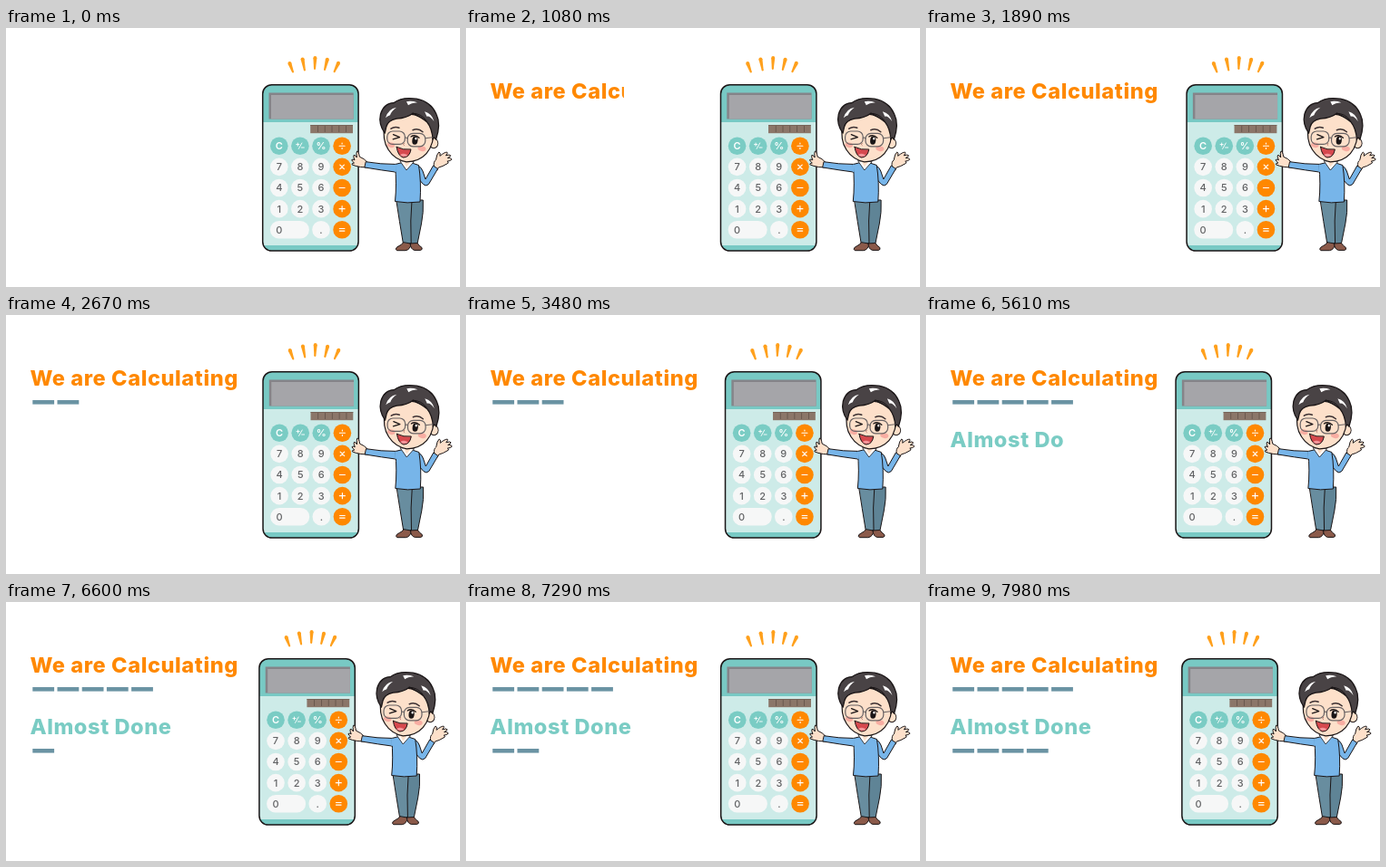
An HTML page with a canvas for the animation above (8 s loop, 500 by 286 pixels).

```html
<!DOCTYPE html>
<html lang="en">
<head>
<meta charset="utf-8">
<title>We are Calculating</title>
<style>
html, body { margin: 0; width: 100%; height: 100%; overflow: hidden; background: #fff; }
canvas { display: block; width: 500px; height: 286px; }
</style>
</head>
<body>
<canvas id="stage"></canvas>
<script>
const W = 500, H = 286, LOOP = 8000;
const ORANGE = '#ff8800', TEAL = '#7accc4', SLATE = '#6a93a3';
const SKIN = '#fde0ca', BLUE = '#77b5e9', INK = '#1a1516';
const canvas = document.getElementById('stage');
const ctx = canvas.getContext('2d');
const dpr = window.devicePixelRatio || 1;
canvas.width = W * dpr;
canvas.height = H * dpr;

// Sideways sway: [time, offset], eased between turning points
const SWAY = [[0, 0], [400, 5], [1200, -2.6], [2050, 5], [2950, -1], [3850, 5],
  [5480, -8.2], [6250, 0], [6850, -6], [7290, -2], [7640, -5], [8000, -0.8]];

function swayAt(t) {
  const i = SWAY.findIndex(k => k[0] > t);
  const [t0, a] = SWAY[i - 1], [t1, b] = SWAY[i];
  return a + (b - a) * (1 - Math.cos(Math.PI * (t - t0) / (t1 - t0))) / 2;
}

function path(d, fill, stroke, width = 1) {
  const p = new Path2D(d);
  if (fill) { ctx.fillStyle = fill; ctx.fill(p); }
  if (stroke) { ctx.strokeStyle = stroke; ctx.lineWidth = width; ctx.stroke(p); }
}

function rect(x, y, w, h, fill) {
  ctx.fillStyle = fill;
  ctx.fillRect(x, y, w, h);
}

function round(x, y, w, h, r, fill, stroke, width = 1) {
  ctx.beginPath();
  ctx.roundRect(x, y, w, h, r);
  if (fill) { ctx.fillStyle = fill; ctx.fill(); }
  if (stroke) { ctx.strokeStyle = stroke; ctx.lineWidth = width; ctx.stroke(); }
}

function oval(x, y, rx, ry, fill, turn = 0) {
  ctx.beginPath();
  ctx.ellipse(x, y, rx, ry, turn, 0, 7);
  ctx.fillStyle = fill;
  ctx.fill();
}

function label(s, x, y, size, color, weight = 500) {
  ctx.font = `${weight} ${size}px Inter, sans-serif`;
  ctx.textAlign = 'center';
  ctx.textBaseline = 'alphabetic';
  ctx.fillStyle = color;
  ctx.fillText(s, x, y);
}

// Headline uncovered from the left at a steady pace
function headline(s, y, color, edge) {
  if (edge <= 26) return;
  ctx.save();
  ctx.beginPath();
  ctx.rect(0, y - 30, edge, 40);
  ctx.clip();
  ctx.font = '800 23.6px Inter, sans-serif';
  ctx.letterSpacing = '0.58px';
  ctx.textAlign = 'left';
  ctx.textBaseline = 'alphabetic';
  ctx.fillStyle = color;
  ctx.fillText(s, 26.4, y);
  ctx.restore();
}

function dashes(y, t) {
  for (let i = 0; i < 5; i++) {
    ctx.globalAlpha = Math.max(0, Math.min(1, (t - i * 480) / 80));
    rect(29.3 + i * 27.2, y, 23.8, 4.6, SLATE);
  }
  ctx.globalAlpha = 1;
}

function sparks() {
  const rays = [[312.4, 39, 316, 48.6], [326.6, 34.4, 328.9, 46.6], [340.4, 33, 340, 45],
    [353.8, 34.8, 351, 46], [366, 38.8, 361.6, 48.2]];
  for (const [x, y, u, v] of rays) {
    const len = Math.hypot(u - x, v - y);
    const nx = (v - y) / len * 2, ny = (x - u) / len * 2;
    path(`M${x - nx} ${y - ny}L${u - nx / 2} ${v - ny / 2}L${u + nx / 2} ${v + ny / 2}L${x + nx} ${y + ny}Z`, '#ffa01c');
    oval(x, y, 2, 2, '#ffa01c');
    oval(u, v, 1, 1, '#ffa01c');
  }
}

function sign(kind, x, y) {
  const marks = {
    '÷': 'M-3 0H3M0 -3.2V-2.2M0 2.2V3.2',
    '×': 'M-2.3 -2.3L2.3 2.3M2.3 -2.3L-2.3 2.3',
    '−': 'M-3 0H3',
    '+': 'M-3 0H3M0 -3V3',
    '=': 'M-2.8 -1.3H2.8M-2.8 1.3H2.8',
    '±': 'M-4.2 -1.6H-1M-2.6 -3.2V0M-1.6 3.2L2 -3.2M1.4 1.8H4.4'
  };
  ctx.save();
  ctx.translate(x, y);
  path(marks[kind], null, '#fff', kind === '±' ? 0.9 : 1.15);
  ctx.restore();
}

function calculator() {
  round(282.7, 62.7, 105.4, 183.4, 10, '#78c9c4');
  rect(283, 104, 104.8, 136, '#cdebe8');
  rect(289.5, 71.5, 93.2, 29, '#858489');
  rect(292, 74, 90.7, 26.5, '#a5a5a9');
  rect(335.2, 107, 46.8, 9.2, '#8b7669');
  for (let i = 1; i < 6; i++) rect(335.2 + i * 7.8, 108, 0.8, 7, '#625249');
  rect(335.2, 107, 46.8, 0.8, '#716056');

  const rows = ['C±%÷', '789×', '456−', '123+', '0 .='];
  rows.forEach((row, r) => [...row].forEach((key, c) => {
    const x = 300.8 + c * 23.1, y = 130.2 + r * 23.15;
    if (key === ' ') return;
    if (key === '0') round(290.9, y - 9.8, 43, 19.6, 9.8, '#f6f7f7');
    else oval(x, y, 9.8, 9.8, c === 3 ? ORANGE : r === 0 ? TEAL : '#f6f7f7');
    if (c === 3 || key === '±') sign(key, x, y);
    else label(key, x, y + 3.9, 11, r === 0 ? '#fff' : '#616264', r === 0 ? 600 : 500);
  }));
  round(282.7, 62.7, 105.4, 183.4, 10, null, INK, 1.5);
}

function legs() {
  path('M444 190L459.3 190Q460 204 457.5 216L453 238.5L445.5 238.5L444 214Z', '#5f8496', INK);
  path('M430 189L447 190L445.8 213L446.2 238.5L437.5 238.5L433.5 214Z', '#688d9f', INK);
  path('M437.5 237Q436 239.5 433 240.5L430 242.5Q428.5 244.5 430.5 245.7H440Q445 245 446.2 238.5Z', '#8b5a4a', INK);
  path('M445.2 238L453 237.5Q455 240.5 458 242.5Q459 244.8 456.5 245.4H450Q445.5 244.5 445.2 238Z', '#8b5a4a', INK);
}

function body() {
  // Raised hand
  ctx.save();
  ctx.translate(0.4, -1.2);
  path('M471 154Q470 149 473 147Q474 140 476.5 138.2Q478.5 138.4 477.5 142.5Q483 138 485.5 138.4Q486.5 139.5 484 142Q488.5 140.4 489.3 142Q489.3 143.2 486 144.8Q490.5 144.5 490.4 146.5Q489 148 485.5 148.4Q487.4 149 486.4 150.5Q480 154.5 476 155.2L474.5 158Z', SKIN, INK);
  ctx.restore();
  path('M453 151.5Q458 154 459 158L462 167L470.5 152L475.5 155.5L465.5 172.5Q462.5 175.5 459.5 172.5L452 164Z', BLUE, INK);
  // Hand resting on the keypad
  path('M397 154L390.5 153.5Q384.5 152.6 381 150.8Q380.5 149.2 383.5 149Q380.6 146.8 380.8 145.5Q381.8 144.5 384 145.8Q382.2 142 383 140.5Q384.4 139.6 386.3 143Q385.5 137.2 386.6 136Q388.2 135.6 389.4 142.2Q394.5 144 398 148.2Z', SKIN, INK);
  path('M396.6 147.8Q412 150.5 431 150.5L432 159.5Q413 157 395.2 154Z', BLUE, INK);
  path('M428.5 150.5Q442 146 454.5 151.5Q457.5 170 456 192Q442 194 428.5 191.5Q430.5 173 428.5 150.5Z', BLUE, INK);
  path('M428.9 151.5V158', null, BLUE, 2);
  path('M434 147L441 157L449 148Z', '#fff', INK, 0.8);
  path('M437 146L441 153.5L447 146Z', SKIN);
}

function lens(x, y) {
  round(x - 9.8, y - 7.2, 19.6, 14.4, 6, null, '#676263', 1.2);
}

function head() {
  ctx.save();
  ctx.translate(0, -1.8);
  oval(471, 129, 5.2, 6, INK);
  oval(471, 129, 4.3, 5.1, SKIN);
  path('M417 108Q414 126 421 136Q428 147 441 149.6Q455 149.5 463 140.5Q472 130 471 111Q445 84 417 108Z', SKIN, INK, 1.2);
  // Hair
  path('M417.2 118Q410 108 412.5 97Q416 85 427 84.5Q436 77.5 452 80Q468 83 474 97Q479.3 108 473.5 125Q471.5 121 470 125Q469.5 113 463.5 105.5Q458 101 448 96Q442 101 430 102Q420.5 104 418.8 111Z', '#494345', INK, 1.3);
  path('M418 101Q421 91 430 89.5Q424 94 423 98Q420 99 418 101Z', '#fff');
  path('M461 94Q469 96 471.5 105Q467 98.5 463.5 99.5Z', '#fff');
  path('M441 83Q447 82 453 84Q446 84.5 443 87Z', '#fff');
  path('M448 96Q457 96 463 104', null, INK, 1);
  // Face
  oval(424, 131, 4.3, 2.8, '#f8ada2', 0.2);
  oval(458, 135, 4.6, 2.8, '#f8ada2', 0.2);
  path('M424 113Q428 110 433 112M448 114.5Q454 112 459 116.5', null, '#3b3032', 1.5);
  path('M426.5 119.5L433.5 122.5L426.2 124.6', null, INK, 1.3);
  oval(450.4, 126, 3.1, 4.6, INK, 0.1);
  oval(451.4, 124, 1, 1.4, '#fff');
  path('M446 121.8Q450.5 118.8 455 123', null, INK, 1.3);
  lens(429.6, 123);
  lens(452, 125.4);
  path('M439.4 123.5Q441 122 442.2 124M461.8 123.5L469.5 122.5', null, '#676263', 1.1);
  path('M438.4 129Q436.4 130.6 438.4 131.4', null, '#a8695d', 0.9);
  path('M430.2 133.2Q437.5 136.8 446 135.8Q444.5 144.8 437.5 144.8Q431.5 143 430.2 133.2Z', '#d6494e', INK, 1);
  path('M434 142Q438 139 442.5 142.4Q438 145.6 434 142Z', '#f5969a');
  ctx.restore();
}

function draw(now) {
  const t = now % LOOP;
  ctx.setTransform(dpr, 0, 0, dpr, 0, 0);
  ctx.lineJoin = ctx.lineCap = 'round';
  rect(0, 0, W, H, '#fff');

  headline('We are Calculating', 77.6, ORANGE, 26 + 0.144 * (t - 54));
  dashes(94, t - 2100);
  headline('Almost Done', 146, TEAL, 26 + 0.1 * (t - 4340));
  dashes(162, t - 6430);

  ctx.translate(swayAt(t), 0);
  sparks();
  calculator();
  legs();
  body();
  head();
  requestAnimationFrame(draw);
}

requestAnimationFrame(draw);
</script>
</body>
</html>
```
